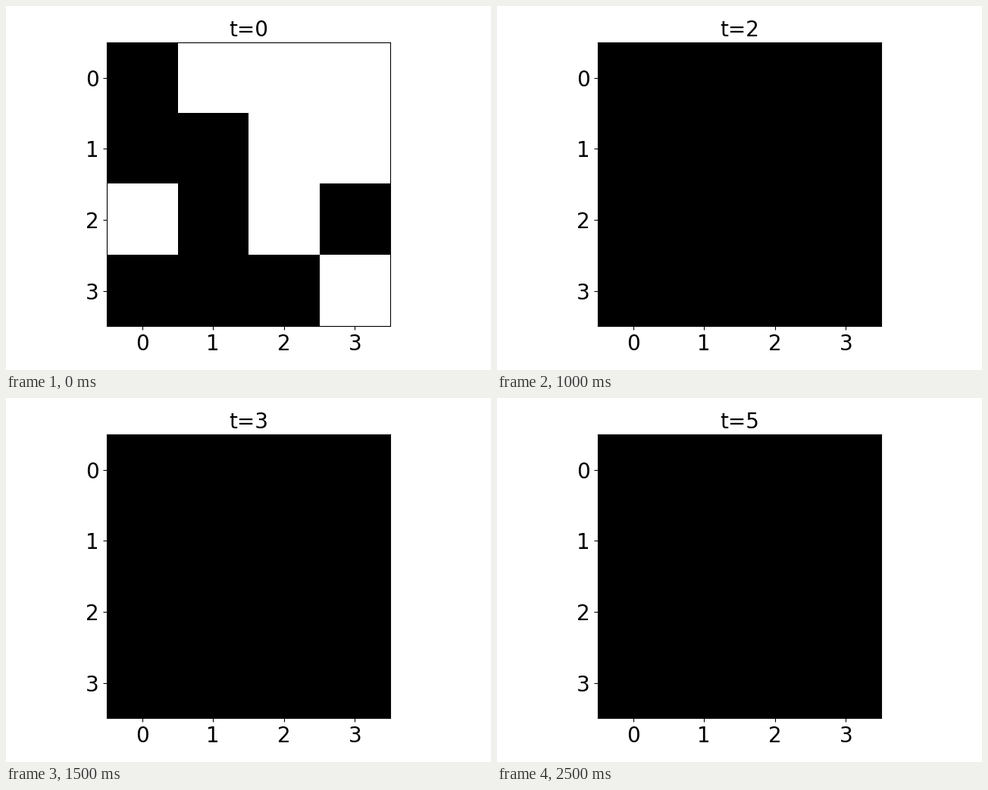
Write a matplotlib script that moves like this. It is 640 px wide and 480 px high and loops after 3000 ms.

```python
import matplotlib.pyplot as plt
import numpy as np
from matplotlib.animation import FuncAnimation

STEPS = 6
START = np.array([
    [0, 1, 1, 1],
    [0, 0, 1, 1],
    [1, 0, 1, 0],
    [0, 0, 0, 1],
])

plt.rcParams.update({"font.family": "DejaVu Sans", "font.size": 20})

fig, ax = plt.subplots(figsize=(6.4, 4.8), dpi=100)
fig.subplots_adjust(left=0.125, right=0.875, bottom=0.12, top=0.9)
image = ax.imshow(START, cmap="gray", vmin=0, vmax=1)
ax.set_xticks(range(4))
ax.set_yticks(range(4))
ax.tick_params(labelsize=20)
title = ax.set_title("t=0", fontsize=20)


def update(step):
    # Every cell goes dark after the first step.
    image.set_data(START if step == 0 else np.zeros_like(START))
    title.set_text(f"t={step}")
    return image, title


anim = FuncAnimation(fig, update, frames=STEPS, interval=500,
                     repeat=True, repeat_delay=0, blit=False)
plt.show()
```
